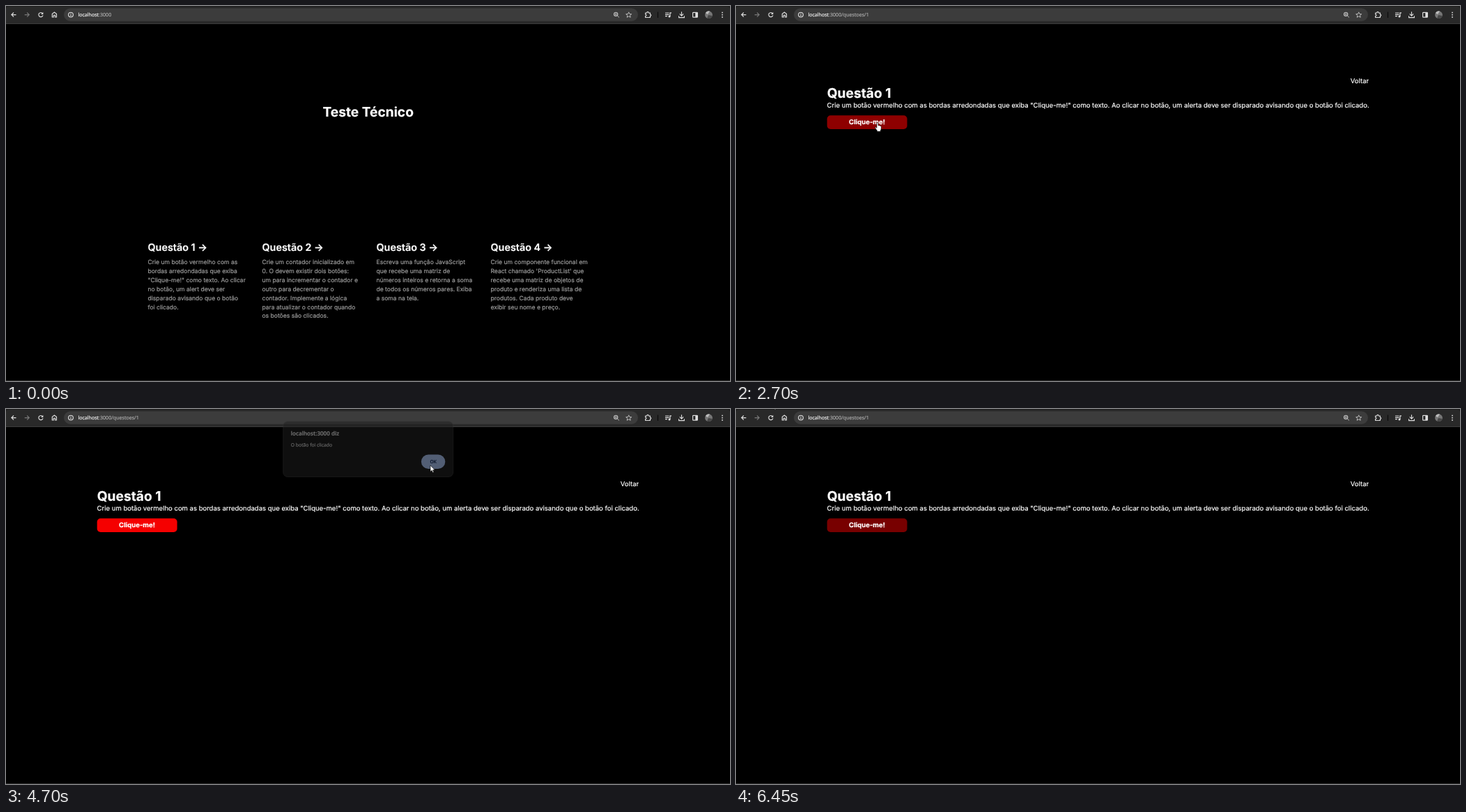
Write an HTML page that moves like this. It is 1039x539 px and loops after 6600 ms.

```html
<!DOCTYPE html>
<html lang="pt-BR">
<head>
<meta charset="utf-8">
<title>Teste Técnico</title>
<style>
html, body { margin: 0; width: 100%; height: 100%; overflow: hidden; background: #000; }
svg { display: block; width: 1039px; height: 539px; }
text { white-space: pre; text-rendering: geometricPrecision; stroke: currentColor; stroke-width: .2; }
.page { font-family: Inter, sans-serif; font-optical-sizing: none; fill: #fff; color: #fff; }
.ui { font-family: "Open Sans", "Noto Sans", sans-serif; }
.ui text, text.ui, .ui tspan, .ui + tspan, #path { fill: currentColor; stroke: currentColor; }
.icon { fill: none; stroke: #dedede; stroke-width: 1.15; }
.solid { fill: #dedede; stroke: none; }
.cursor { fill: #fff; stroke: #000; stroke-width: .6; stroke-linejoin: round; }
.h1 { font-size: 19.18px; font-weight: 700; }
.h2 { font-size: 14.36px; font-weight: 600; }
.p { font-size: 8.56px; fill: #9c9c9c; color: #9c9c9c; }
.body { font-size: 9.527px; }
</style>
</head>
<body>
<svg id="stage" viewBox="0 0 1039 539" xmlns="http://www.w3.org/2000/svg">
  <rect width="1039" height="539" fill="#000"/>
  <rect y="538" width="1039" height="1" fill="#2b2b2b"/>

  <g id="home" class="page">
    <text class="h1" x="519.7" y="158.7" text-anchor="middle">Teste Técnico</text>
    <rect id="frame" x="191.8" y="327.8" width="163.5" height="133.8" rx="7" fill="none" stroke="#272727" stroke-width=".8"/>
    <g id="cards"></g>
  </g>

  <g id="question" class="page">
    <text class="body" x="908.1" y="111.1" text-anchor="end">Voltar</text>
    <text class="h1" x="130.7" y="132">Questão 1</text>
    <text class="body" x="130.6" y="145.9">Crie um botão vermelho com as bordas arredondadas que exiba "Clique-me!" como texto. Ao clicar no botão, um alerta deve ser disparado avisando que o botão foi clicado.</text>
    <rect id="button" x="130.7" y="157.3" width="114.9" height="19.7" rx="5"/>
    <text class="body" x="188" y="170.2" text-anchor="middle" font-weight="700">Clique-me!</text>
  </g>

  <g id="toolbar">
    <rect width="1039" height="26" fill="#1c1c1c"/>
    <path d="M0 26V5Q0 1 4 1H1035Q1039 1 1039 5V26Z" fill="#292929"/>
    <rect y="25" width="1039" height="1" fill="#3b3b3b"/>
    <rect x="83" y="3.2" width="824" height="18.6" rx="9.3" fill="#3c3c3c"/>
    <g class="icon">
      <path d="M14.5 12.6H8M11 9.5L7.9 12.6 11 15.7"/>
      <path d="M26.7 12.6H33.2M30.2 9.5L33.3 12.6 30.2 15.7" stroke="#777"/>
      <path d="M52.3 10.5A3.1 3.1 0 1 0 53 13.3"/>
      <path class="solid" d="M53.4 8.8V12H50.2Z"/>
      <path d="M66.3 16V11.4L69.4 9 72.5 11.4V16H70.5V13.2H68.3V16Z"/>
      <circle cx="93" cy="12.6" r="3.4"/>
      <path d="M93 12.2V14.7M93 10.4V11.4"/>
      <g stroke="#c6c6c6">
        <circle cx="875.2" cy="11.8" r="2.6"/>
        <path d="M877.2 13.8L880 16.5M873.9 11.8H876.5M875.2 10.5V13.1" stroke-width=".9"/>
        <path d="M893.7 8.8L894.8 11.4 897.7 11.7 895.5 13.5 896.2 16.3 893.7 14.8 891.2 16.3 891.9 13.5 889.7 11.7 892.6 11.4Z" stroke-width=".9"/>
      </g>
      <path d="M917.6 10H919.6Q919.8 8.3 921 8.3T922.4 10H924.4V12Q925.7 12.2 925.7 13.2T924.4 14.4V16.5H917.6V14.5Q919 14.3 919 13.2T917.6 12Z"/>
      <path d="M935.5 8.5V17" stroke="#0c0c0c"/>
      <path d="M946 10H951.5M946 12.3H951.5M946 14.6H949M953 15V9.8H955"/>
      <circle class="solid" cx="952" cy="15" r="1.5"/>
      <path d="M969.5 8.3V14M966.8 11.4L969.5 14.1 972.2 11.4M965.6 14.2V16.6H973.4V14.2"/>
      <rect x="985.6" y="9.3" width="6.8" height="6.8" rx=".7"/>
      <rect class="solid" x="989.3" y="9.3" width="3.1" height="6.8"/>
    </g>
    <circle cx="1008.5" cy="12.7" r="5.4" fill="#777"/>
    <path d="M1003.8 10A5.4 5.4 0 0 1 1010 7.5L1007 12Z" fill="#bcbcbc"/>
    <path d="M1008 13L1013.7 14A5.4 5.4 0 0 1 1006 17.5Z" fill="#474747"/>
    <g fill="#dedede">
      <circle cx="1028" cy="9.4" r=".9"/><circle cx="1028" cy="12.7" r=".9"/><circle cx="1028" cy="16" r=".9"/>
    </g>
    <text class="ui" x="103.4" y="15.2" font-size="7.1" color="#f4f4f4">localhost<tspan id="path" color="#a8a8a8"></tspan></text>
  </g>

  <g id="status" class="ui">
    <rect x="1.3" y="523.5" width="93" height="13.2" rx="2.5" fill="#292929" stroke="#454545" stroke-width=".6"/>
    <text x="5.5" y="532.6" font-size="6.8" color="#bdbdbd">localhost:3000/questoes/1</text>
  </g>

  <g id="alert" class="ui">
    <rect x="397.7" y="20.2" width="244" height="79.8" rx="6.5" fill="#1f1f1f" stroke="#373737" stroke-width=".8"/>
    <text x="408.8" y="40.4" font-size="8.1" font-weight="600" color="#e3e3e3">localhost:3000 diz</text>
    <text x="408.8" y="56.4" font-size="6.8" color="#c7c7c7">O botão foi clicado</text>
    <rect id="ring" x="594.2" y="66.2" width="37.6" height="24" rx="12" fill="none" stroke="#a8c1ee" stroke-width="1.3"/>
    <rect x="595.9" y="67.9" width="34.4" height="20.6" rx="10.3" fill="#a3bbe8"/>
    <text x="613.1" y="80.7" font-size="6.6" font-weight="600" color="#1c3058" text-anchor="middle">OK</text>
  </g>

  <g id="cursor" class="cursor">
    <path id="pointer" d="M0 0V9.2L2.1 7.3 3.5 10.4 4.9 9.8 3.6 6.8H6.4Z"/>
    <path id="hand" d="M-1 .9Q-1 0 0 0T1 .9V4.2Q1.9 3.6 2.6 4.4Q3.6 4 4 4.9Q5.2 4.7 5.4 6V8.5Q5.2 10.5 4.4 11.2V12.8H-.6V11.4Q-2 10 -3.3 7.4Q-3.6 6.2 -2.4 6.6L-1 7.8Z"/>
  </g>
</svg>
<script>
const LOOP = 6600, STEP = 50;
const $ = id => document.getElementById(id);

const cards = [
  ["Crie um botão vermelho com as", "bordas arredondadas que exiba", "\"Clique-me!\" como texto. Ao clicar",
   "no botão, um alert deve ser", "disparado avisando que o botão", "foi clicado."],
  ["Crie um contador inicializado em", "0. O devem existir dois botões:", "um para incrementar o contador e",
   "outro para decrementar o", "contador. Implemente a lógica", "para atualizar o contador quando", "os botões são clicados."],
  ["Escreva uma função JavaScript", "que recebe uma matriz de", "números inteiros e retorna a soma",
   "de todos os números pares. Exiba", "a soma na tela."],
  ["Crie um componente funcional em", "React chamado 'ProductList' que", "recebe uma matriz de objetos de",
   "produto e renderiza uma lista de", "produtos. Cada produto deve", "exibir seu nome e preço."]
];

$("cards").innerHTML = cards.map((lines, i) => {
  const x = 203.5 + 164 * i;
  const rows = lines.map((s, j) =>
    `<text class="p" x="${x}" y="${(371.1 + 12.88 * j).toFixed(2)}">${s}</text>`).join("");
  return `<text class="h2" x="${x}" y="351.5">Questão ${i + 1} <tspan id="go${i}">→</tspan></text>${rows}`;
}).join("");

// Cursor keys: time, x, y
const route = [
  [350, 22, -6], [800, 188, 328], [1000, 223, 348], [1300, 226, 350],
  [2000, 226, 350], [2250, 236, 270], [2500, 222, 200], [2650, 206, 172], [2700, 203, 167.5],
  [3400, 203, 167.5], [3500, 212, 195], [3700, 380, 178], [3950, 586, 101],
  [4250, 609, 81], [4700, 609, 81], [4900, 667, 108], [5050, 590, 125], [5250, 448, 100],
  [5300, 448, 100], [5550, 59.5, 6.6], [5600, 59.5, 6.6], [5850, 34, 3], [6000, 31, -6],
  [6050, 31, -12], [6150, 30, -12], [6200, 30, -6], [6450, 52.2, -9.4], [LOOP, 52.2, -9.4]
];

const clamp = v => Math.max(0, Math.min(1, v));
const ramp = (t, start, length) => clamp((t - start) / length);
const mix = (a, b, k) => a + (b - a) * k;
const within = (t, a, b) => t >= a && t < b;
const show = (id, on) => { $(id).style.display = on ? "" : "none"; };

// CSS "ease" timing: cubic-bezier(.25, .1, .25, 1)
function ease(x) {
  const bez = (a, b, s) => 3 * a * s * (1 - s) ** 2 + 3 * b * s * s * (1 - s) + s ** 3;
  let lo = 0, hi = 1;
  for (let i = 0; i < 20; i++) {
    const mid = (lo + hi) / 2;
    if (bez(.25, .25, mid) < x) lo = mid; else hi = mid;
  }
  return bez(.1, 1, lo);
}

function locate(t) {
  const i = Math.max(1, route.findIndex(k => k[0] >= t));
  const [a, b] = [route[i - 1], route[i]];
  const k = ramp(t, a[0], b[0] - a[0]);
  return [mix(a[1], b[1], k), mix(a[2], b[2], k)];
}

function draw(t) {
  const home = t < 1800;
  show("home", home);
  show("question", !home);
  $("path").textContent = home ? ":3000" : ":3000/questoes/1";

  const hover = ease(ramp(t, 800, 200));
  $("frame").style.opacity = hover;
  $("go0").setAttribute("dx", 2.4 * hover);

  $("status").style.opacity = ramp(t, 1000, 200) * (1 - ramp(t, 2000, 200));

  const heat = ease(ramp(t, 2658, 300)) - ease(ramp(t, 4675, 300));
  $("button").setAttribute("fill", `rgb(${Math.round(mix(120, 255, heat))},0,0)`);

  const leave = ramp(t, 4550, 300);
  show("alert", within(t, 3300, 4750));
  $("alert").style.opacity = ramp(t, 3250, 130) * (1 - leave);
  $("alert").setAttribute("transform", `translate(0 ${-5 * leave})`);
  show("ring", t < 4600);

  const [x, y] = locate(t);
  const hand = within(t, 800, 1850) || within(t, 2650, 3450);
  show("cursor", t >= 350);
  show("hand", hand);
  show("pointer", !hand);
  $("cursor").setAttribute("transform", `translate(${x} ${y})`);
}

function tick() {
  const t = performance.now() % LOOP;
  draw(Math.floor(t / STEP) * STEP);
  requestAnimationFrame(tick);
}
tick();
</script>
</body>
</html>
```
